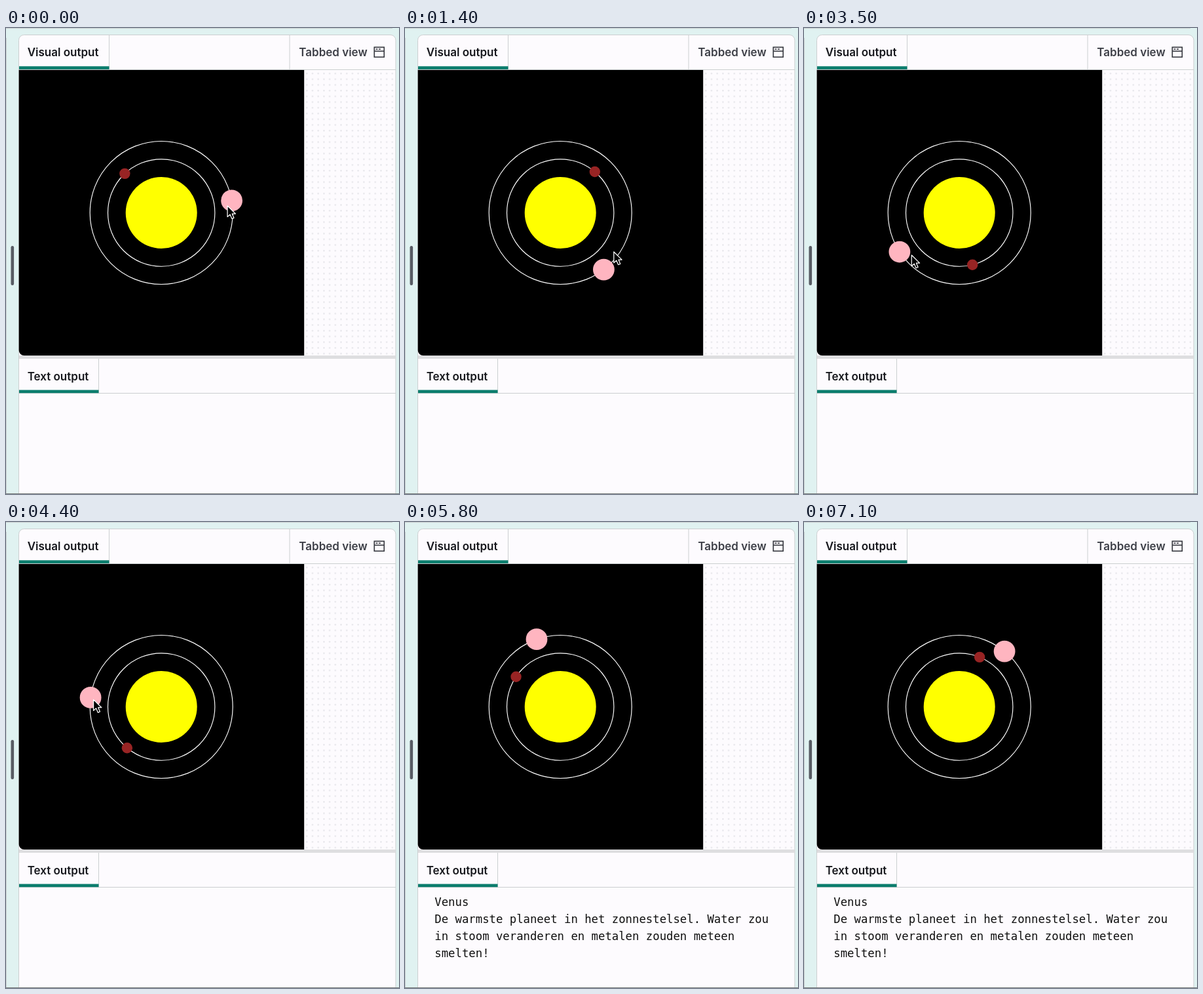
An HTML page that plays this animation: 600 by 710 pixels, repeating every 7.2 s.

```html
<!DOCTYPE html>
<html lang="en">
<head>
<meta charset="utf-8">
<title>Orbits</title>
<style>
  html, body { margin: 0; width: 100%; height: 100%; overflow: hidden; background: #e0f2f1; }
  svg { display: block; width: 600px; height: 710px; }
  .tab { font: 600 17px Inter, sans-serif; fill: #16171c; }
  .out { font: 17.3px "DejaVu Sans Mono", monospace; fill: #111; white-space: pre; }
  .line { fill: none; stroke: #cbcfd0; }
  .accent { fill: #0b7d6d; }
  .orbit { fill: none; stroke: #fff; stroke-width: 1.15; }
</style>
</head>
<body>
<svg viewBox="0 0 600 710">
  <defs>
    <pattern id="dots" x="454.9" y="65" width="8.71" height="8.71" patternUnits="userSpaceOnUse">
      <circle cx="4.35" cy="4.35" r="1.1" fill="#dfdfe4"/>
    </pattern>
  </defs>

  <!-- Panel -->
  <path class="line" d="M0 .5H590M.5 15V710"/>
  <path d="M19.5 710V18.500a8 8 0 0 1 8-8H587a8 8 0 0 1 8 8V710" fill="#fdfbfe" stroke="#cbcfd0"/>
  <rect x="455" y="64" width="139.500" height="435" fill="url(#dots)"/>
  <path class="line" d="M20 63.500H595M157.500 11V63M433 11V63"/>
  <rect class="accent" x="20" y="58.300" width="137.500" height="4.700"/>
  <text class="tab" x="32.700" y="43">Visual output</text>
  <text class="tab" x="447.300" y="43" style="fill:#3d3f47">Tabbed view</text>
  <g fill="none" stroke="#34363d" stroke-width="1.600">
    <rect x="562.300" y="29.300" width="15" height="15"/>
    <path d="M562 35.300H577.500"/>
    <path d="M564.500 32.300H573" stroke-dasharray="3 1.500"/>
  </g>
  <rect x="7.500" y="332" width="4.600" height="60" rx="2.300" fill="#575b63"/>

  <!-- Text area -->
  <rect x="20" y="499" width="575" height="5" fill="#dedee0"/>
  <path class="line" d="M20 556.500H595M141.500 504V556"/>
  <rect class="accent" x="20" y="551.500" width="121.500" height="4.700"/>
  <text class="tab" x="32.700" y="536.500">Text output</text>
  <g id="info" class="out"></g>
  <rect y="709" width="600" height="1" fill="#777b7b"/>

  <!-- Sky -->
  <path d="M19.700 64H455.200V499H27.700a8 8 0 0 1-8-8Z"/>
  <g transform="translate(237.200 281.500)">
    <circle class="orbit" r="81.700"/>
    <circle class="orbit" r="109"/>
    <circle r="54.500" fill="#ff0"/>
    <circle id="inner" r="8.200" fill="#982424"/>
    <circle id="outer" r="16.400" fill="#ffb5c0"/>
    <path id="pointer" d="M0 0V16.800L4 13.200L6.800 19.700L9.900 18.400L7.200 12.100H12.300Z"
      fill="#000" stroke="#fff" stroke-width="1.250" stroke-linejoin="round"/>
  </g>
</svg>
<script>
  const LOOP = 7200, STEP = 100;
  const get = id => document.getElementById(id);
  const inner = get('inner'), outer = get('outer'), pointer = get('pointer'), info = get('info');

  const lines = [
    'Venus',
    ' De warmste planeet in het zonnestelsel. Water zou',
    'in stoom veranderen en metalen zouden meteen',
    'smelten!'
  ];
  lines.forEach((line, i) => {
    const text = document.createElementNS('http://www.w3.org/2000/svg', 'text');
    text.setAttribute('x', 45.3);
    text.setAttribute('y', 585 + i * 26);
    text.setAttribute('xml:space', 'preserve');
    text.textContent = line;
    info.append(text);
  });

  // Rows of [time, value, ...]
  const sweep = [[0, 0], [1400, 62.4], [2300, 102.7], [3500, 156.7],
    [4400, 197.2], [5800, 260.4], [7100, 319]];
  const chase = [[0, -6, 101.4], [1400, 36.1, 101], [2300, 77.8, 99.2],
    [3500, 138.5, 97.4], [4400, 186, 104.2], [4500, 188, 106], [4900, 187, 181]];

  function sample(rows, t) {
    let i = 1;
    while (i < rows.length - 1 && rows[i][0] < t) i++;
    const a = rows[i - 1], b = rows[i];
    const k = Math.min(1, (t - a[0]) / (b[0] - a[0]));
    return a.slice(1).map((v, n) => v + (b[n + 1] - v) * k);
  }

  function place(el, deg, radius) {
    const a = deg * Math.PI / 180;
    el.setAttribute('transform', `translate(${radius * Math.cos(a)} ${radius * Math.sin(a)})`);
  }

  function show(el, on) {
    el.setAttribute('visibility', on ? 'visible' : 'hidden');
  }

  function draw(now) {
    const t = Math.floor(now % LOOP / STEP) * STEP;
    const [turn] = sample(sweep, t);
    place(outer, turn - 9.8, 109);
    place(inner, turn * 4 / 3 - 133.1, 81.7);
    place(pointer, ...sample(chase, t));
    show(pointer, t < 5000);
    show(info, t >= 4600);
  }

  const start = performance.now();
  function tick() {
    draw(performance.now() - start);
    requestAnimationFrame(tick);
  }
  tick();
</script>
</body>
</html>
```
